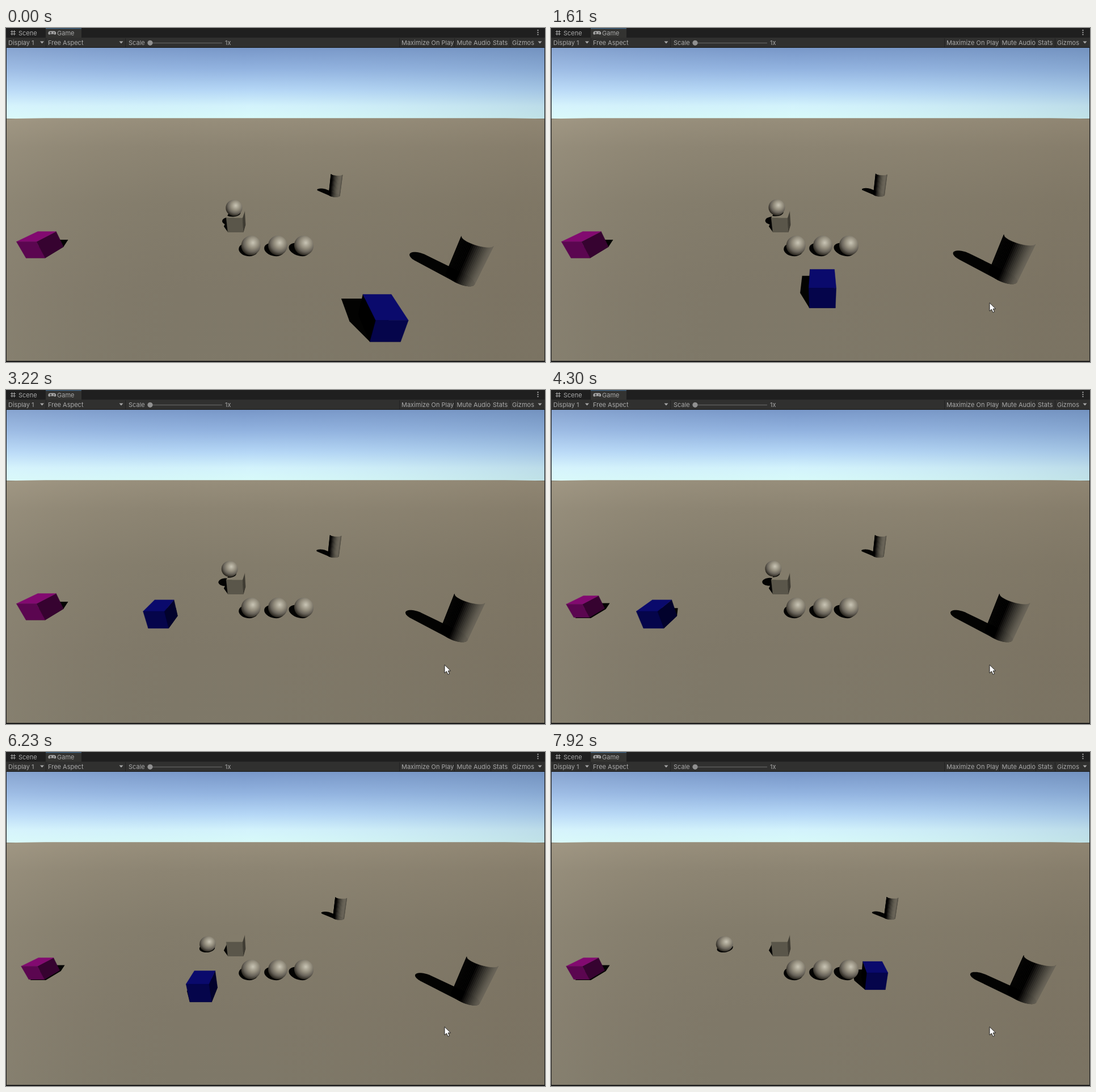
Animation, 950 px wide and 590 px high, one loop 8000 ms. Source, as an HTML page:

```html
<!DOCTYPE html>
<html lang="en">
<head>
<meta charset="utf-8">
<title>Game view</title>
<style>
  html, body { margin: 0; width: 100%; height: 100%; overflow: hidden; background: #191919; }
  svg { display: block; width: 950px; height: 590px; }
  text { font: 11px Inter, sans-serif; fill: #a8a8a8; }
</style>
</head>
<body>
<svg viewBox="0 0 950 590" xmlns="http://www.w3.org/2000/svg">
  <defs>
    <linearGradient id="sky" x2="0" y2="1">
      <stop offset="0" stop-color="#7897c8"/>
      <stop offset=".3" stop-color="#92b3e0"/>
      <stop offset=".6" stop-color="#b5d7f6"/>
      <stop offset=".82" stop-color="#d3f3fc"/>
      <stop offset="1" stop-color="#d8faf9"/>
    </linearGradient>
    <linearGradient id="skySide">
      <stop offset="0" stop-color="#e8f6ff" stop-opacity=".14"/>
      <stop offset=".45" stop-color="#a0bcd8" stop-opacity="0"/>
      <stop offset="1" stop-color="#5f7f9c" stop-opacity=".2"/>
    </linearGradient>
    <linearGradient id="ground" gradientUnits="userSpaceOnUse" x1="0" y1="159" x2="0" y2="588">
      <stop offset="0" stop-color="#978e7b"/>
      <stop offset=".12" stop-color="#8c8472"/>
      <stop offset=".35" stop-color="#837c6b"/>
      <stop offset=".7" stop-color="#7f7868"/>
      <stop offset="1" stop-color="#7e7868"/>
    </linearGradient>
    <linearGradient id="groundSide" gradientUnits="userSpaceOnUse" x1="0" y1="159" x2="900" y2="300">
      <stop offset="0" stop-color="#fff4dc" stop-opacity=".09"/>
      <stop offset=".4" stop-color="#8a8270" stop-opacity="0"/>
      <stop offset="1" stop-color="#6a5c48" stop-opacity=".16"/>
    </linearGradient>
    <radialGradient id="ball" cx=".6" cy=".36" r=".72">
      <stop offset="0" stop-color="#c8c4b4"/>
      <stop offset=".16" stop-color="#b3ae9e"/>
      <stop offset=".4" stop-color="#928c7c"/>
      <stop offset=".65" stop-color="#68635a"/>
      <stop offset=".86" stop-color="#353129"/>
      <stop offset="1" stop-color="#0b0a08"/>
    </radialGradient>
    <filter id="soft" x="-10%" y="-10%" width="120%" height="120%"><feGaussianBlur stdDeviation=".7"/></filter>
    <clipPath id="view"><rect x="1" y="35" width="948" height="553"/></clipPath>
    <clipPath id="crateTop"><polygon id="crateTopShape"/></clipPath>
  </defs>

  <rect width="950" height="590" fill="#191919"/>
  <rect width="950" height="17" fill="#1f1f1f"/>
  <rect x="70" width="63" height="18" fill="#333331"/>
  <rect x="70" width="63" height="1.4" fill="#3d6080"/>
  <rect y="17" width="950" height="17" fill="#30302f"/>
  <g id="bar">
    <path d="M8 6.500h9M8 10.500h9M10.500 4v9M14.500 4v9" stroke="#a8a8a8" fill="none"/>
    <path d="M78 5.500h6.500a3.500 3.500 0 0 1 2.700 6q-1.200 1-2.400-.7h-7q-1.200 1.700-2.400.7a3.500 3.500 0 0 1 2.600-6z" fill="#a8a8a8"/>
    <path d="M77 8.500h3.600M78.800 6.700v3.600" stroke="#30302f"/>
    <circle cx="84.500" cy="8.500" r="1.100" fill="#30302f"/>
    <path d="M60 23.500h7l-3.500 4zM199.500 23.500h7l-3.500 4zM937.500 23.500h7l-3.500 4z" fill="#a8a8a8"/>
    <path d="M70.500 18v16M210.500 18v16M693.500 18v16M790.500 18v16M854.500 18v16M888.500 18v16" stroke="#222"/>
    <path d="M254 26.500h127" stroke="#5c5c5c" stroke-width="1.500"/>
    <circle cx="254" cy="26.300" r="4.600" fill="#909090"/>
    <path d="M936.500 3h2v2h-2zM936.500 6.700h2v2h-2zM936.500 10.400h2v2h-2z" fill="#a8a8a8"/>
  </g>

  <g clip-path="url(#view)">
    <rect y="35" width="950" height="125" fill="url(#sky)"/>
    <rect y="35" width="950" height="125" fill="url(#skySide)"/>
    <path id="land" d="M0 160.300L70 159.300H880L950 160.300V588H0z" fill="url(#ground)"/>
    <path d="M0 160.300L70 159.300H880L950 160.300V588H0z" fill="url(#groundSide)"/>
    <g id="shadows" fill="#030302" filter="url(#soft)"></g>
    <g id="solids"></g>
    <path id="cursor" d="M0 0V14.500L3.500 11.400L6 17L8.600 15.900L6.200 10.500H10.600Z" fill="#fff" stroke="#111" stroke-width=".9"/>
  </g>
</svg>
<script>
const NS = 'http://www.w3.org/2000/svg';
const $ = id => document.getElementById(id);
const LOOP = 8000, STEP = LOOP / 104;

// Camera: focal length, centre, pitch and height above the ground
const F = 360, CX = 475, CY = 311.5, COS = .9207, SIN = .3902, H = 6.72;
// Ground displacement of a shadow per unit of height
const SX = -.4195, SZ = .7267;

function make(tag, attrs, parent) {
  const el = document.createElementNS(NS, tag);
  for (const k in attrs) el.setAttribute(k, attrs[k]);
  parent.appendChild(el);
  return el;
}

function project([x, y, z]) {
  const h = y - H, d = z * COS - h * SIN;
  return [CX + F * x / d, CY - F * (h * COS + z * SIN) / d, F / d];
}

const drop = ([x, y, z]) => [x + SX * y, 0, z + SZ * y];
const plot = pts => pts.map(p => p[0].toFixed(2) + ',' + p[1].toFixed(2)).join(' ');
const setPoly = (el, pts) => el.setAttribute('points', plot(pts.map(project)));

function hull(pts) {
  const sorted = [...pts].sort((a, b) => a[0] - b[0] || a[1] - b[1]);
  const half = list => {
    const out = [];
    for (const p of list) {
      while (out.length > 1) {
        const [a, b] = out.slice(-2);
        if ((b[0] - a[0]) * (p[1] - a[1]) - (b[1] - a[1]) * (p[0] - a[0]) > 0) break;
        out.pop();
      }
      out.push(p);
    }
    return out.slice(0, -1);
  };
  return [...half(sorted), ...half(sorted.reverse())];
}

const newShadow = () => make('polygon', {}, $('shadows'));
const castShadow = (el, pts) => el.setAttribute('points', plot(hull(pts.map(drop).map(project))));

// Linear interpolation through [time, value] pairs
function track(t, keys) {
  let i = 1;
  while (i < keys.length - 1 && t > keys[i][0]) i++;
  const [t0, a] = keys[i - 1], [t1, b] = keys[i];
  const k = Math.min(1, Math.max(0, (t - t0) / (t1 - t0)));
  return a + (b - a) * k;
}

// Box with visible top, front and side faces; y is the height of its centre
function box(top, front, right, left) {
  const shadow = newShadow();
  const face = fill => make('polygon', { fill, stroke: fill, 'stroke-width': .4 }, $('solids'));
  const side = face(right), topEl = face(top), frontEl = face(front);
  return (x, y, z, size = 1) => {
    const s = size / 2;
    const v = (i, j, k) => [x + i * s, y + j * s, z + k * s];
    const e = x > 0 ? -1 : 1, tone = x > 0 ? left : right;
    side.setAttribute('fill', tone);
    side.setAttribute('stroke', tone);
    setPoly(side, [v(e, 1, -1), v(e, 1, 1), v(e, -1, 1), v(e, -1, -1)]);
    setPoly(topEl, [v(-1, 1, -1), v(-1, 1, 1), v(1, 1, 1), v(1, 1, -1)]);
    setPoly(frontEl, [v(-1, 1, -1), v(1, 1, -1), v(1, -1, -1), v(-1, -1, -1)]);
    const corners = [];
    for (const i of [-1, 1]) for (const j of [-1, 1]) for (const k of [-1, 1]) corners.push(v(i, j, k));
    castShadow(shadow, corners);
  };
}

// Outline of a ball's shadow on the plane at the given height
function ballShadow(x, y, z, level, r = .5) {
  const len = Math.hypot(SX, SZ), ux = SX / len, uz = SZ / len;
  return Array.from({ length: 32 }, (_, i) => {
    const a = i * Math.PI / 16, p = r * Math.cos(a), q = r * Math.sin(a) / .766;
    return [x + SX * (y - level) - uz * p + ux * q, level, z + SZ * (y - level) + ux * p + uz * q];
  });
}

function sphere() {
  const shadow = newShadow();
  const el = make('circle', { r: 1, fill: 'url(#ball)' }, $('solids'));
  return (x, y, z) => {
    const [px, py, s] = project([x, y, z]);
    const dx = px - CX, dy = py - CY;
    const turn = Math.atan2(dy, dx) * 180 / Math.PI, r = s * .51;
    const stretch = Math.hypot(1, dx / F, dy / F);
    el.setAttribute('transform',
      `translate(${px} ${py}) rotate(${turn}) scale(${r * stretch} ${r}) rotate(${-turn})`);
    setPoly(shadow, ballShadow(x, y, z, 0));
  };
}

// Upright tube, radius .5 and height 2, shaded in vertical strips
function cylinder() {
  const N = 56, shadow = newShadow(), strips = [];
  const rim = (x, y, z, a) => [x + .5 * Math.cos(a), y, z + .5 * Math.sin(a)];
  const angle = i => i * 2 * Math.PI / N;
  for (let i = 0; i < N; i++) {
    const a = angle(i + .5);
    const lit = Math.max(0, .321 * Math.cos(a) - .557 * Math.sin(a));
    const fill = `rgb(${[164, 156, 137].map(c => Math.round(c * lit)).join()})`;
    strips.push(make('polygon', { fill, stroke: fill, 'stroke-width': .5 }, $('solids')));
  }
  return (x, z) => {
    const outline = [];
    strips.forEach((el, i) => {
      const a = angle(i), b = angle(i + 1), m = angle(i + .5);
      outline.push(rim(x, 0, z, a), rim(x, 2, z, a));
      const facing = x * Math.cos(m) + z * Math.sin(m) < -.5;
      if (facing) setPoly(el, [rim(x, 2, z, a), rim(x, 2, z, b), rim(x, 0, z, b), rim(x, 0, z, a)]);
      else el.setAttribute('points', '');
    });
    castShadow(shadow, outline);
  };
}

// Created from far to near
const farTube = cylinder();
const crate = box('#837c6b', '#5a564a', '#3f3c33', '#000');
const crateShade = make('polygon', { fill: '#060604', 'clip-path': 'url(#crateTop)' }, $('solids'));
const roller = sphere();
const pink = box('#820a70', '#5b0650', '#360330', '#000');
const row = [-1.3, .12, 1.5].map(x => [sphere(), x]);
const nearTube = cylinder();
const blue = box('#0a0a6c', '#05054b', '#02022c', '#000');

crate(-2.55, .5, 11.82);
setPoly($('crateTopShape'), [[-3.05, 1, 11.32], [-3.05, 1, 12.32], [-2.05, 1, 12.32], [-2.05, 1, 11.32]]);
for (const [draw, x] of row) draw(x, .5, 9.09);

const BLUE_X = [[0, 3.57], [480, 3.57], [1070, 1.75], [2220, -2.37], [3830, -8.19], [4900, -8.19],
  [5070, -7.8], [5540, -5.36], [5880, -4.9], [6770, -1.1], [7000, -.07], [8000, 3.2]];
const BLUE_Z = [[0, 4.87], [840, 4.87], [1070, 5.23], [1680, 6.44], [2220, 8.19], [2350, 8.54],
  [4400, 8.54], [4900, 7.75], [7300, 7.75], [7920, 8.7]];
const ROLL_X = [[0, -2.61], [1070, -2.72], [2220, -2.83], [4300, -3.02], [4900, -3.15], [5250, -3.35],
  [5540, -3.67], [7000, -5.39], [7920, -6.43]];
const ROLL_Y = [[0, 1.5], [4800, 1.5], [5150, 1.4], [5350, 1.17], [5540, .83], [5680, .5]];
const ROLL_Z = [[0, 11.75], [4300, 11.95], [5700, 12.03]];

function draw(t) {
  const bx = track(t, BLUE_X), bz = track(t, BLUE_Z);
  blue(bx, .5, bz);
  pink(-12.48, .5, 9.19, t < 3800 ? 1 : .82);

  // The tubes follow a tenth of the blue box's motion, except to the left
  const dx = t > 4000 ? .1 * Math.max(0, bx + 8.19) : 0, dz = .1 * (bz - 4.87);
  nearTube(8.4 + dx, 7.25 + dz);
  farTube(5.55 + dx, 18.1 + dz);

  const x = track(t, ROLL_X), y = track(t, ROLL_Y), z = track(t, ROLL_Z);
  roller(x, y, z);
  setPoly(crateShade, y > 1.3 ? ballShadow(x, y, z, 1) : []);

  const mx = track(t, [[350, 872], [680, 773]]), my = track(t, [[350, 576], [680, 485.5]]);
  $('cursor').setAttribute('transform', `translate(${mx} ${my})`);
  $('cursor').setAttribute('visibility', t < 350 ? 'hidden' : 'visible');
}

for (const [x, y, label] of [[22, 13, 'Scene'], [90, 13, 'Game'], [4, 30, 'Display 1'], [74, 30, 'Free Aspect'],
  [216, 30, 'Scale'], [386, 30, '1x'], [697, 30, 'Maximize On Play'], [794.5, 30, 'Mute Audio'],
  [858, 30, 'Stats'], [892, 30, 'Gizmos']]) make('text', { x, y }, $('bar')).textContent = label;

function tick() {
  const t = performance.now() % LOOP;
  draw(Math.floor(t / STEP) * STEP);
  requestAnimationFrame(tick);
}
tick();
</script>
</body>
</html>
```
